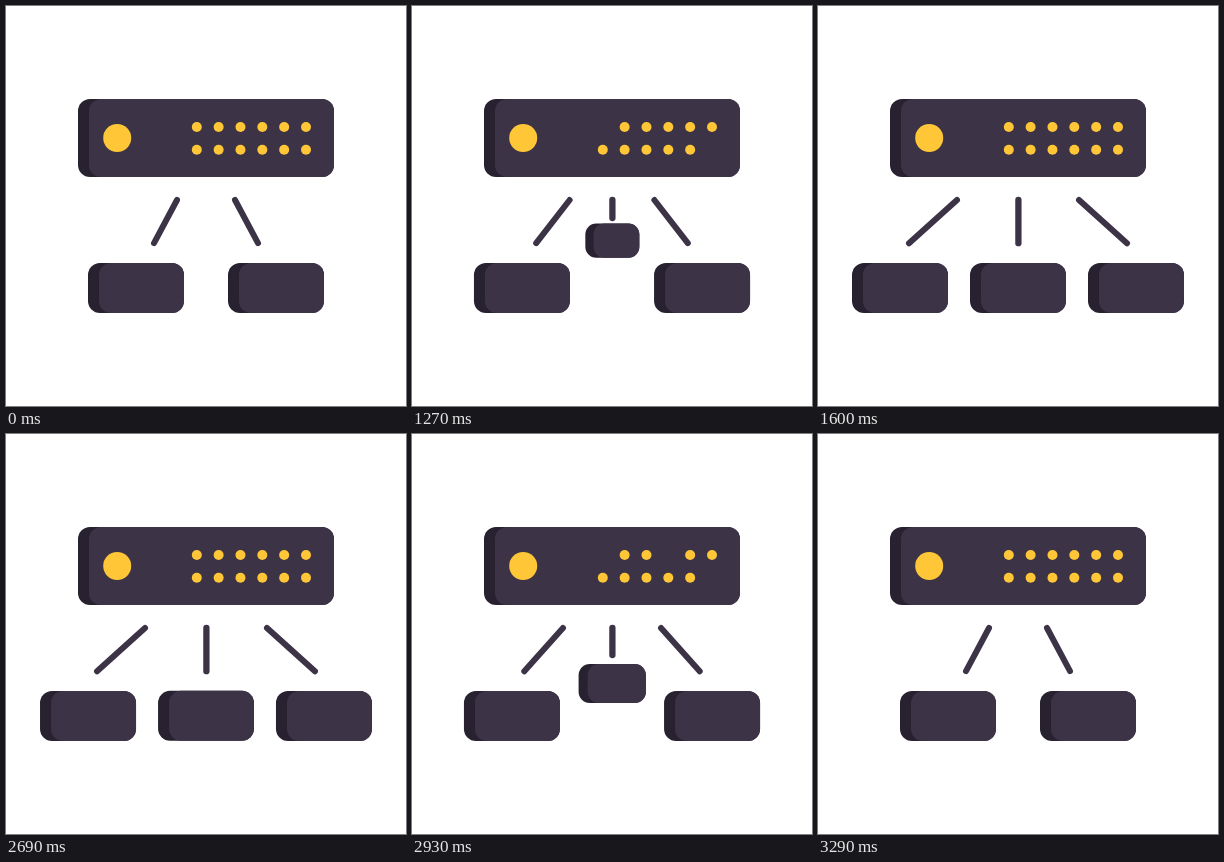
An HTML page for the animation above (3.32 s loop, 400 by 400 pixels).

```html
<!DOCTYPE html>
<html lang="en">
<head>
<meta charset="utf-8">
<title>Server</title>
<style>
  html, body { margin: 0; width: 100%; height: 100%; overflow: hidden; background: #fff; }
  svg { display: block; width: 100%; height: 100%; }
  .back { fill: #272130; }
  .front { fill: #3c3446; }
  .lamp { fill: #ffc637; }
  line { stroke: #3c3446; stroke-width: 6; stroke-linecap: round; }
</style>
</head>
<body>
<svg id="stage" viewBox="0 0 400 400"></svg>
<script>
const LOOP = 3320, STEP = 30, SPAN = 20;
const stage = document.getElementById('stage');

function set(node, attrs) {
  for (const name in attrs) node.setAttribute(name, attrs[name]);
  return node;
}

function add(tag, attrs) {
  return stage.appendChild(set(document.createElementNS('http://www.w3.org/2000/svg', tag), attrs));
}

const clamp = v => Math.min(1, Math.max(0, v));
const ease = v => v * v * (3 - 2 * v);
const mix = (a, b, p) => a + (b - a) * p;

function makeBox() {
  const back = add('rect', { class: 'back' });
  const front = add('rect', { class: 'front' });
  return (x, y, width, height, side = 11, radius = 12) => {
    set(back, { x, y, width, height, rx: radius });
    set(front, { x: x + side, y, width: width - side, height, rx: radius });
  };
}

makeBox()(72, 93, 256, 78);
add('circle', { class: 'lamp', cx: 111.2, cy: 132, r: 14 });

const dots = [121, 143.8].flatMap(cy =>
  Array.from({ length: 6 }, (_, i) => add('circle', { class: 'lamp', cx: 190.8 + i * 21.84, cy, r: 5 })));

// Dot index, then first and last step of each dark spell.
const darkSpells = [[0, 7, 13], [3, 4, 8], [3, 13, 17], [11, 6, 14]];

const sides = [-1, 1].map(sign => ({ sign, line: add('line', {}), box: makeBox() }));
const midLine = add('line', {});
const midBox = makeBox();

function drawSides(p) {
  for (const { sign, line, box } of sides) {
    set(line, {
      x1: 200 + sign * mix(29, 61, p), y1: 194,
      x2: 200 + sign * mix(52, 109, p), y2: 237.2
    });
    box(152 + sign * mix(70, 118, p), 257, 96, 50);
  }
}

function drawMiddle(p, open) {
  const pop = clamp(open / 0.12);
  const m = ease(open);
  const w = mix(22, 96, m) * pop, h = mix(22, 50, m) * pop;
  const cx = mix(200.6, 200, m), cy = mix(198.4, 282, m);
  set(midLine, {
    x1: 200.4, y1: 194, x2: 200.4, y2: mix(194, 237.2, p),
    style: `stroke-width:${pop ? 6.3 * Math.min(1, pop + 0.3) : 0}`,
    visibility: pop ? 'visible' : 'hidden'
  });
  midBox(cx - w / 2, cy - h / 2, w, h, mix(6, 11, m) * pop, mix(10, 12, m) * pop);
}

function draw(time) {
  const t = time % LOOP;
  const closing = t >= 2690;
  const k = Math.max(0, Math.floor((t - (closing ? 2660 : 1000)) / STEP));
  const lag = closing ? 0.7 : 0.1;
  const lead = 0.2;
  const progress = shift => {
    const v = k ? clamp((k - lag + shift) / SPAN) : 0;
    return closing ? 1 - v : v;
  };
  const p = ease(progress(0));
  drawSides(p);
  drawMiddle(p, progress(lead));

  const beat = closing ? k - 1 : k;
  dots.forEach((dot, i) => {
    const dark = darkSpells.some(([n, from, to]) => n === i && beat >= from && beat <= to);
    set(dot, { visibility: dark ? 'hidden' : 'visible' });
  });
}

function tick(now) {
  draw(now);
  requestAnimationFrame(tick);
}
draw(0);
requestAnimationFrame(tick);
</script>
</body>
</html>
```
